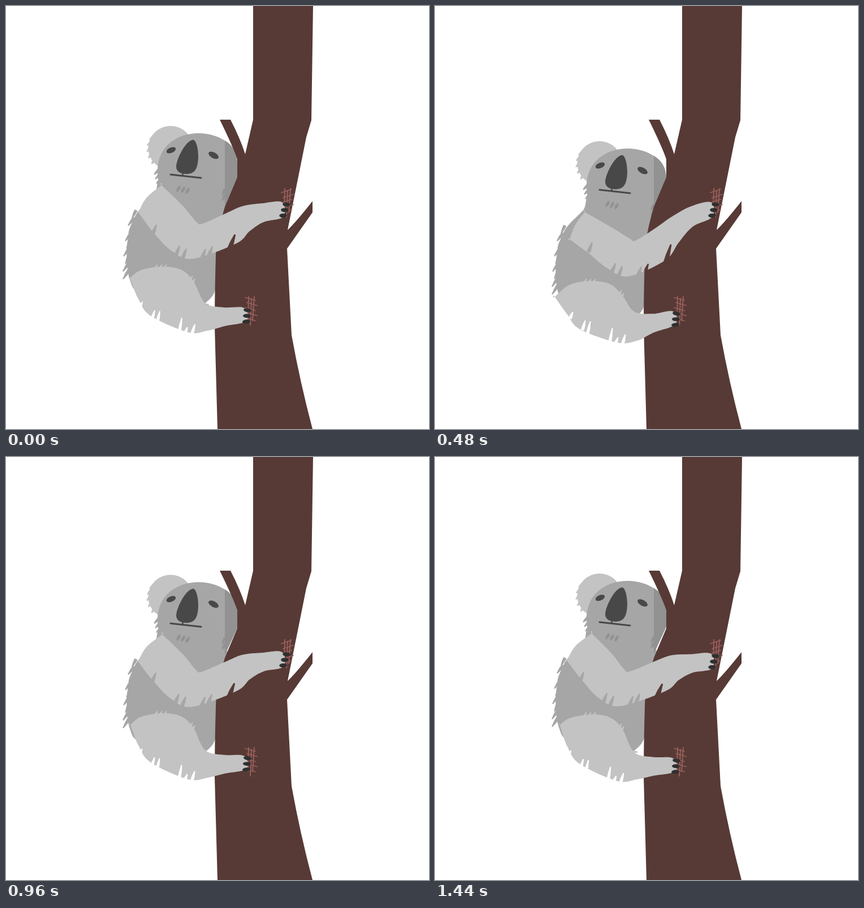
Animation, 748 px wide and 748 px high, one loop 1520 ms. Source, as an HTML page with a canvas:

```html
<!DOCTYPE html>
<html lang="en">
<head>
<meta charset="utf-8">
<title>Climbing koala</title>
<style>
html, body { margin: 0; width: 100%; height: 100%; overflow: hidden; background: #fff; }
canvas { display: block; width: 100vw; height: 100vh; }
</style>
</head>
<body>
<canvas id="stage" width="748" height="748"></canvas>
<script>
const SIZE = 748, LOOP = 1520, STEP = 80;
const LIGHT = '#c3c3c3', MID = '#a6a6a6', SHADE = '#929292', DARK = '#484848';
const CLAW = '#2f3030', BARK = '#573a35', SCRATCH = '#985f5c', CHIP = '#42211f';

const stage = document.getElementById('stage').getContext('2d');
const layer = document.createElement('canvas');
layer.width = layer.height = SIZE;
const limb = layer.getContext('2d');

const mix = (a, b, u) => a + (b - a) * u;
const repeat = (n, fn) => { for (let i = 0; i < n; i++) fn(i); };

// Sine easing between poses given as [ms, px].
function ease(t, poses) {
  const i = poses.findIndex(p => p[0] > t);
  if (i < 0) return poses[poses.length - 1][1];
  const [t0, v0] = poses[i - 1], [t1, v1] = poses[i];
  return mix(v0, v1, (1 - Math.cos(Math.PI * (t - t0) / (t1 - t0))) / 2);
}

const bodyShift = t => ease(t, [[0, 0], [80, -6], [480, 27], [600, 28], [880, -6], [1120, 3], [1400, -6], [LOOP, -6]]);
const handShift = t => ease(t, [[0, 0], [480, 0], [640, 11], [800, 10], [1120, -14], [1440, 1], [LOOP, 0]]);
const footShift = t => ease(t, [[0, 0], [300, 0], [600, 9], [720, 9], [1120, -13], [LOOP, 0]]);

// Closed smooth shape; a repeated point makes a corner.
function blob(g, color, pts) {
  const n = pts.length, p = i => pts[(i + n) % n];
  g.fillStyle = color;
  g.beginPath();
  g.moveTo(...p(0));
  repeat(n, i => {
    const [a, b, c, d] = [p(i - 1), p(i), p(i + 1), p(i + 2)];
    g.bezierCurveTo(b[0] + (c[0] - a[0]) / 6, b[1] + (c[1] - a[1]) / 6,
      c[0] - (d[0] - b[0]) / 6, c[1] - (d[1] - b[1]) / 6, c[0], c[1]);
  });
  g.fill();
}

function fillPath(g, color, path) {
  g.fillStyle = color;
  g.fill(path);
}

function oval(g, color, x, y, rx, ry, angle = 0) {
  g.fillStyle = color;
  g.beginPath();
  g.ellipse(x, y, rx, ry, angle, 0, Math.PI * 2);
  g.fill();
}

function line(g, color, width, x, y, x2, y2) {
  g.strokeStyle = color;
  g.lineWidth = width;
  g.lineCap = 'round';
  g.beginPath();
  g.moveTo(x, y);
  g.lineTo(x2, y2);
  g.stroke();
}

// Tapered tuft of fur reaching (dx, dy) from its base.
function tuft(g, color, x, y, dx, dy, width = 6) {
  const half = width / 2 / Math.hypot(dx, dy), nx = -dy * half, ny = dx * half;
  const mx = x + dx / 2, my = y + dy / 2;
  g.fillStyle = color;
  g.beginPath();
  g.moveTo(x + nx, y + ny);
  g.quadraticCurveTo(mx + nx, my + ny, x + dx + nx * .3, y + dy + ny * .3);
  g.lineTo(x + dx - nx * .3, y + dy - ny * .3);
  g.quadraticCurveTo(mx - nx, my - ny, x - nx, y - ny);
  g.fill();
}

// Draws a limb on its own layer so that fur notches can be cut out of it.
function drawLimb(outline, cutNotches) {
  limb.clearRect(0, 0, SIZE, SIZE);
  blob(limb, LIGHT, outline);
  limb.globalCompositeOperation = 'destination-out';
  cutNotches();
  limb.globalCompositeOperation = 'source-over';
  stage.drawImage(layer, 0, 0);
}

const trunk = new Path2D('M437 0V201L423 262L409 271V303L387 355Q371 410 371 441Q369 510 369 566' +
  'L374 748H542Q520 665 505 582L497 429L498 396L531 232L540 202L543 0Z');
const branches = new Path2D('M378 201H397Q414 234 423 262L412 300L409 271Q402 250 378 201Z' +
  'M542 345V365L497 429L490 400L498 396Q512 383 542 345Z');
const skull = new Path2D('M268 292C268 250 300 225 341 225C358 225 374 230 387 238' +
  'C402 247 409 260 409 280V306L386 356L340 386L275 320C269 311 268 302 268 292Z');
const nose = new Path2D('M331 236.5C317 238 301 272 301 284C301 293 309 297 319 297' +
  'C334 297 339 288 340 268C340 254 337 238 331 236.5Z');

// Crossed claw marks; tilt sets the slant of the cross strokes.
function drawScratch(g, x, y, tilt) {
  repeat(3, i => line(g, SCRATCH, 2, x - 4 + 5 * i, y + 3 * (i % 2), x - 5 + 4 * i, y + 42 + 8 * (i % 2)));
  repeat(5, i => {
    const shift = 3 * (i % 2), cy = y + 4 + 9 * i;
    line(g, SCRATCH, 1.8, x - 10 + shift, cy + tilt, x + 8 + shift, cy - tilt);
  });
}

function drawTree(g) {
  fillPath(g, BARK, trunk);
  fillPath(g, BARK, branches);
  drawScratch(g, 497, 323, 3);
  drawScratch(g, 433, 514, -2.5);
}

function drawBody(g) {
  blob(g, MID, [[282, 308], [262, 334], [228, 372], [214, 425], [219, 484], [245, 510],
    [352, 526], [352, 526], [370, 502], [373, 440], [390, 345]]);
  repeat(9, i => {
    const u = i / 8, x = 215 + 15 * (1 - u) ** 2 + 3 * u;
    tuft(g, MID, x, 361 + 105 * u, -7 - 4 * (i % 2 || u === 1), 14 + 3 * u);
  });
}

function drawHead(g) {
  oval(g, LIGHT, 291, 251, 39.5, 39);
  repeat(5, i => {
    const a = 3.75 - .3 * i;
    tuft(g, LIGHT, 294 + 38 * Math.cos(a), 251 + 38 * Math.sin(a), -9 + i, 7);
  });
  fillPath(g, MID, skull);
  g.save();
  g.clip(skull);
  g.fillStyle = SHADE;
  g.fillRect(387, 220, 30, 140);
  g.restore();
  repeat(2, i => tuft(g, SHADE, 388, 324 + 10 * i, -6, 10));
  repeat(3, i => tuft(g, MID, 271 + 2 * i, 289 + 8 * i, -9, 9));

  fillPath(g, DARK, nose);
  oval(g, DARK, 292, 255, 8.7, 4.7, -.4);
  oval(g, DARK, 367, 264, 9.8, 5, .5);
  line(g, DARK, 2.5, 312.5, 294, 312.5, 300);
  line(g, DARK, 3, 291, 298, 345, 304);
  repeat(3, i => oval(g, SHADE, 305 + 8 * i, 323 + 2 * i, 6, 2.6, -1.05));
}

// d, f and h are the shifts of body, foot and hand.
function drawLeg(g, d, f) {
  const top = .75 * d + .9 * f, low = .45 * d + f, knee = .35 * d + f;
  const hip = [219 - .27 * d, 481 + 1.1 * d + .6 * f];
  repeat(3, i => tuft(g, LIGHT, 263 + 8 * i, 465 + top, 5, -8, 4));
  repeat(2, i => tuft(g, LIGHT, 326 + 4 * i, 484 + 5 * i + top, 4, -7, 4));
  drawLimb([
    hip, hip, [239, 467 + top], [276, 461 + top], [309, 466 + top], [331, 486 + top],
    [352, 525 + knee], [385, 533 + .2 * d + f], [421, 534 + f], [425, 557 + f],
    [387, 566 + .2 * d + f], [357, 574 + low], [322, 577 + low],
    [256, 548 + .65 * d + f], [234, 518 + .8 * d + f]
  ], () => [236, 258, 267, 306, 316, 329].forEach((x, i) => {
    const edge = 580 - .0061 * (x - 322) ** 2 + low;
    tuft(limb, '#000', x + .1 * d, edge, 5, -12 - 5 * (i % 4));
  }));
  repeat(3, i => oval(g, CLAW, 427 - i, 538 + 10 * i + f, 7, 3.4, .15 - .12 * i));
}

function drawArm(g, d, h) {
  const bend = d + .028 * d * d, low = 1.15 * d + .5 * h, slide = .45 * d - .3 * h;
  const neck = [275 - .37 * d, 317 + bend], back = [234 + .15 * d, 365 + bend];
  const elbow = [347 + .28 * d - .2 * h, 385 + 1.1 * d + .6 * h];
  drawLimb([
    neck, neck, [mix(neck[0], elbow[0], .52), mix(neck[1], elbow[1], .53)],
    [elbow[0] - 11, elbow[1] - 4], elbow,
    [388, 367 + d + .6 * h], [418, 354 + .7 * d + .8 * h], [452, 349 + .2 * d + h],
    [488, 347 + h], [490, 373 + h], [456, 382 + .3 * d + h], [431, 398 + .75 * d + h],
    [407, 420 + 1.1 * d + .8 * h], [330 + slide, 447 + low], [293 + slide, 433 + low],
    [262 + .35 * d, 402 + 1.3 * d + .4 * h], back, back,
    [mix(back[0], neck[0], .5) - 6 + .1 * d, mix(back[1], neck[1], .5) - 2]
  ], () => {
    [259, 300, 312, 346, 358].forEach(x => {
      const edge = 450 - .009 * (x - 330) ** 2 + low;
      tuft(limb, '#000', x + slide, edge, 7, -18, 7);
    });
    tuft(limb, '#000', 394 + slide, 433 + d + .8 * h, 11, -29 - .35 * d, 9);
  });
  repeat(3, i => oval(g, CLAW, 496 - 3 * i, 351 + 9.8 * i + h, 6.8, 3.6, .12 - .08 * i));
}

// Bark chips knocked loose by the hand.
function drawChips(g, t) {
  if (t < 640 || t >= 880) return;
  const u = (t - 640) / 160;
  repeat(3, i => {
    const x = mix(481 + 2 * i, 482 - 12 * (i % 2), u);
    const y = mix(392 + 7 * i, 501 + 22 * i, u * (.7 + .3 * u));
    oval(g, SCRATCH, x + 4.5, y - 1, 1.6, 3.8, .1);
    oval(g, CHIP, x, y, 3.2, 2.8);
  });
}

function draw(g, t) {
  const d = bodyShift(t);
  g.fillStyle = '#fff';
  g.fillRect(0, 0, SIZE, SIZE);
  g.save();
  g.translate(0, d);
  drawBody(g);
  drawHead(g);
  g.restore();
  drawTree(g);
  drawChips(g, t);
  drawLeg(g, d, footShift(t));
  drawArm(g, d, handShift(t));
}

const start = performance.now();
function tick() {
  const t = (performance.now() - start) % LOOP;
  draw(stage, Math.floor(t / STEP) * STEP);
  requestAnimationFrame(tick);
}
tick();
</script>
</body>
</html>
```
